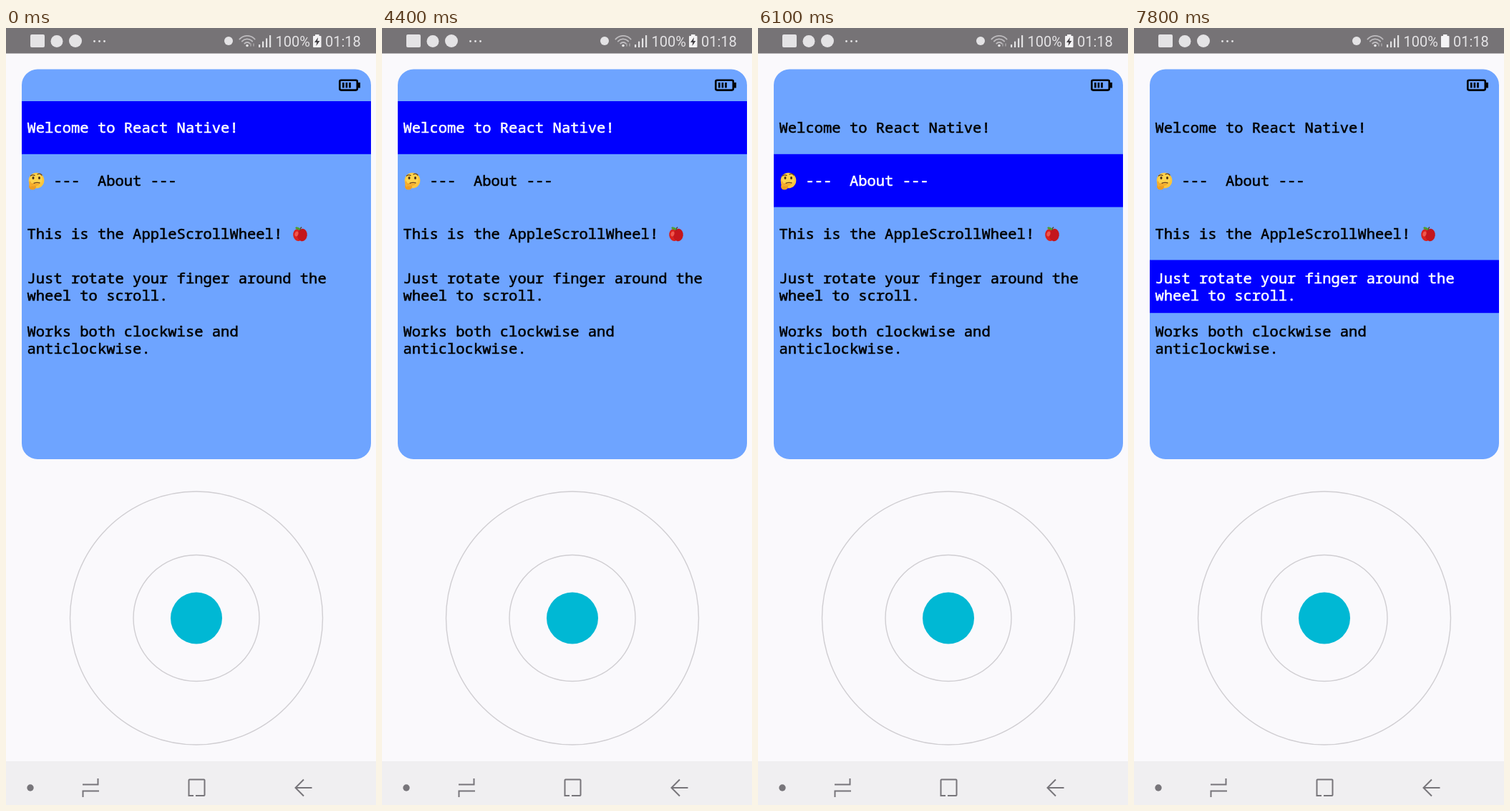
Recreate the animation shown at these times as an HTML page with a canvas. Size 517 by 1083 pixels, loop 8000 ms.

```html
<!DOCTYPE html>
<html lang="en">
<head>
<meta charset="utf-8">
<title>Scroll wheel</title>
<style>
html, body { margin: 0; width: 100%; height: 100%; overflow: hidden; background: #faf9fc; }
canvas { display: block; width: 517px; height: 1083px; }
</style>
</head>
<body>
<canvas id="stage" width="517" height="1083"></canvas>
<script>
const c = document.getElementById('stage').getContext('2d');
const LOOP = 8000;
const BOLT_OFF = 6600;
const ROW_TOP = 102, ROW_H = 73.8;
const GREY = '#e4e3e5', NAV = '#77757a';

// [time, selected row]
const STEPS = [
  [0, 0], [4870, 1], [5130, 2], [5370, 3], [5870, 2], [6100, 1], [6330, 0],
  [7070, 1], [7300, 2], [7570, 3]
];

const ROWS = [
  [['Welcome to React Native!', 146]],
  [['     ---  About ---'.slice(2), 220]],
  [['This is the AppleScrollWheel!', 294]],
  [['Just rotate your finger around the', 356], ['wheel to scroll.', 380]],
  [['Works both clockwise and', 430], ['anticlockwise.', 454]]
];

function rect(x, y, w, h, color) {
  c.fillStyle = color;
  c.fillRect(x, y, w, h);
}

function round(x, y, w, h, r, color) {
  c.fillStyle = color;
  c.beginPath();
  c.roundRect(x, y, w, h, r);
  c.fill();
}

function oval(x, y, rx, ry, color, tilt = 0) {
  c.fillStyle = color;
  c.beginPath();
  c.ellipse(x, y, rx, ry, tilt, 0, Math.PI * 2);
  c.fill();
}

const disc = (x, y, r, color) => oval(x, y, r, r, color);

function ring(x, y, r, color, width) {
  c.strokeStyle = color;
  c.lineWidth = width;
  c.beginPath();
  c.arc(x, y, r, 0, Math.PI * 2);
  c.stroke();
}

function line(d, color, width) {
  c.strokeStyle = color;
  c.lineWidth = width;
  c.stroke(new Path2D(d));
}

function label(text, x, y, font, color) {
  c.font = font;
  c.fillStyle = color;
  c.fillText(text, x, y);
}

function statusBar(charging) {
  rect(0, 0, 517, 35.5, '#767376');
  round(34, 9, 20, 18, 2, GREY);
  disc(71, 18.5, 8.5, GREY);
  disc(97, 18, 9, GREY);
  for (let i = 0; i < 3; i++) disc(123.5 + i * 7, 18.5, 1.4, GREY);
  disc(311, 18, 6, GREY);

  c.lineCap = 'round';
  c.strokeStyle = '#bdbbbe';
  c.lineWidth = 1.8;
  for (let i = 0; i < 3; i++) {
    c.beginPath();
    c.arc(337, 25, 5 + i * 4.6, -Math.PI * 0.77, -Math.PI * 0.23);
    c.stroke();
  }
  disc(337, 24.5, 1.8, GREY);
  line('M342 25V22M346 22V25', '#a5a3a6', 1.6);
  c.lineCap = 'butt';

  for (let i = 0; i < 4; i++) {
    const h = 4 + i * 4.3;
    rect(353 + i * 5, 27 - h, 2.2, h, GREY);
  }
  label('100%', 376.5, 26, '20px Roboto, sans-serif', GREY);
  label('01:18', 446, 26, '20px Roboto, sans-serif', GREY);

  rect(432, 9, 5.5, 3, '#f4f3f5');
  round(429, 11, 11.5, 16, 1, '#f4f3f5');
  if (charging) {
    c.fillStyle = '#444246';
    c.fill(new Path2D('M436 13L431 20H434.2L433.4 25L438.4 18H435.2Z'));
  }
}

function thinkingFace() {
  disc(42.5, 212.5, 10.8, '#fbc63c');
  disc(42, 211, 8.6, '#ffd44d');
  oval(38, 209, 1.5, 2, '#4b3019');
  oval(46.5, 209, 1.5, 2, '#4b3019');
  c.lineCap = 'round';
  line('M34.5 206Q37 204 40 205.5M44 204Q47.5 201.8 50 205M39 216.5Q43 214.5 47 216', '#6b4420', 1.4);
  c.lineCap = 'butt';
  oval(37, 221, 5, 4.6, '#ee9d22');
  oval(41, 218.5, 6, 1.8, '#f5ae2e', -0.2);
  oval(34, 217.5, 1.7, 4, '#f5ae2e', -0.2);
}

function apple() {
  oval(408, 288.5, 6.8, 8.6, '#d8221f', -0.12);
  oval(414, 288.5, 6.8, 8.8, '#c4161c', 0.12);
  oval(406, 287, 2.4, 3.6, '#f0574c', 0.3);
  line('M411 282Q411 279 413 277.5', '#5b3a1c', 1.5);
  oval(408, 279.5, 3.8, 1.7, '#4f9c32', 0.35);
}

function card(selected) {
  round(22, 57.5, 488, 543.5, 22, '#6ea4ff');
  rect(22, ROW_TOP + selected * ROW_H, 488, ROW_H, '#0000ff');

  c.strokeStyle = '#000';
  c.lineWidth = 2.6;
  c.beginPath();
  c.roundRect(466.3, 72.8, 24.5, 13.8, 2);
  c.stroke();
  rect(491, 76, 4, 7.5, '#000');
  for (let i = 0; i < 3; i++) rect(470 + i * 4.6, 76, 2.6, 7.4, '#000');

  const font = '20.5px "Noto Sans Mono", "DejaVu Sans Mono", monospace';
  ROWS.forEach((lines, row) => {
    const color = row === selected ? '#fff' : '#000';
    for (const [text, y] of lines) {
      label(text, 29.5, y, font, color);
      c.strokeStyle = color;
      c.lineWidth = 0.55;
      c.strokeText(text, 29.5, y);
    }
  });
  thinkingFace();
  apple();
}

function wheel() {
  ring(266, 822.5, 176.5, '#d0ced2', 1.4);
  ring(266, 822.5, 88, '#d0ced2', 1.4);
  disc(266, 822.5, 36, '#00b8d4');
}

function navBar() {
  rect(0, 1022, 517, 61, '#f0eff1');
  disc(34, 1059, 4.7, NAV);
  line('M107 1054.5H128.5V1046M107.5 1072V1063.5H130', NAV, 2);
  line('M262 1070H255.5V1048.5Q255.5 1047.5 256.5 1047.5H276.5Q277.5 1047.5 277.5 1048.5V1069Q277.5 1070 276.5 1070H265', NAV, 2);
  line('M427.5 1059H405M416 1047.5L404.5 1059L416 1070.5', NAV, 2);
}

function draw(t) {
  const selected = STEPS.findLast(([start]) => t >= start)[1];
  rect(0, 0, 517, 1083, '#faf9fc');
  statusBar(t < BOLT_OFF);
  card(selected);
  wheel();
  navBar();
}

const begin = performance.now();
function tick() {
  draw((performance.now() - begin) % LOOP);
  requestAnimationFrame(tick);
}
tick();
</script>
</body>
</html>
```
